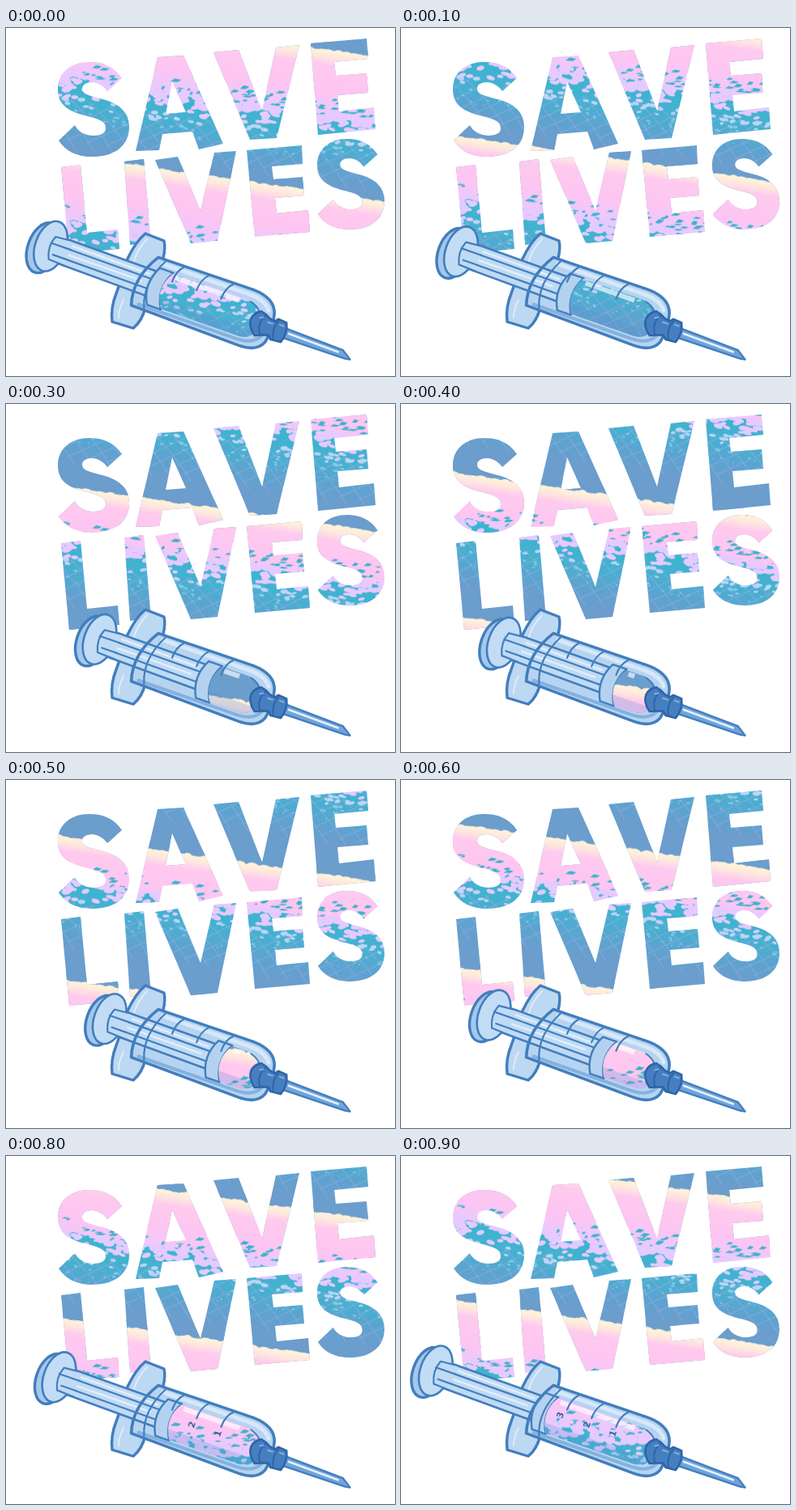
An HTML page with a canvas that plays this animation: 480x430 px, repeating every 1000 ms.

```html
<!DOCTYPE html>
<html lang="en">
<head>
<meta charset="utf-8">
<title>Save lives</title>
<style>
html, body { margin: 0; width: 100%; height: 100%; overflow: hidden; background: #fff; }
canvas { display: block; width: 480px; height: 430px; }
</style>
</head>
<body>
<canvas id="stage" width="480" height="430" role="img" aria-label="SAVE LIVES">SAVE LIVES</canvas>
<script>
const ctx = document.getElementById('stage').getContext('2d');
const TAU = Math.PI * 2;
const STEP = 100;
const PERIOD = 177;      // height of one colour cycle
const LEAD = 12;         // blue kept above the cloud edge
const SHORE = 58;        // mean depth where the water begins
const SLOPE = 0.147;     // tilt of the colour bands
const ANGLE = 19.3 * Math.PI / 180;
const LINE = '#427ebd';

// One entry per step: band scroll and plunger travel
const scroll = [0, 23, 39, 55, 71, 87, 102, 117, 133, 155];
const travel = [0, 20, 43, 64, 76, 77, 63, 40, 11, -13];

// ---------- lettering ----------
const bigS = new Path2D('M143 62C133 47 119 42 103 42C80 42 64 55 64 76C64 97 80 104 101 109' +
  'C117 113 123 116 123 124C123 130 117 133 108 133C97 133 88 127 85 120L65 139' +
  'C73 152 88 159 106 159C135 159 152 145 152 122C152 102 137 92 115 87' +
  'C100 83 94 81 94 75C94 70 99 67 106 67C113 67 120 71 125 78Z');
const letters = new Path2D(
  'M187 36L219 34L268 143L238 150L230 128L193 131L189 151L160 152ZM205 66L197 106L222 104Z' +
  'M256 30L287 27L316 102L333 24L362 21L334 136L301 138Z' +
  'M376 19L445 13L447 38L405 42L407 59L445 56L447 80L409 83L411 103L454 98L456 125L385 132Z' +
  'M68 172L92 169L100 253L138 249L140 273L78 279Z' +
  'M146 165L170 162L179 265L153 268Z' +
  'M184 163L212 159L240 226L257 154L284 152L261 263L228 266Z' +
  'M297 151L365 145L366 168L328 171L330 187L366 184L368 207L332 210L334 229L373 225L375 252L307 258Z');
letters.addPath(bigS);
letters.addPath(bigS, new DOMMatrix([0.943, 0, 0, 0.957, 323.6, 96.8]));

// ---------- colour bands ----------
let seed = 7;
function rnd(a, b) {
  seed = (seed * 16807) % 2147483647;
  return a + (b - a) * seed / 2147483647;
}

function layer(height) {
  const c = document.createElement('canvas');
  c.width = 480;
  c.height = height;
  return c.getContext('2d');
}

function fade(g, from, to, stops) {
  const grad = g.createLinearGradient(0, from, 0, to);
  stops.forEach(([at, color]) => grad.addColorStop(at, color));
  return grad;
}

function blob(g, x, y, rx, ry, turn) {
  g.beginPath();
  g.ellipse(x, y, rx, ry, turn, 0, TAU);
  g.fill();
}

// cloud edge melting into pink
function makeSky() {
  const g = layer(120);
  g.translate(0, LEAD);
  g.fillStyle = '#6b9dcd';
  g.fillRect(0, -LEAD, 480, LEAD + 4);
  g.fillStyle = '#fff1d9';
  for (let x = -4; x < 490; x += rnd(5, 10)) blob(g, x, 2, rnd(6, 10), rnd(3, 6), 0);
  g.fillStyle = fade(g, 0, 80, [[0, '#fff1d9'], [0.08, '#ffe6df'], [0.2, '#ffcaee'], [0.6, '#fdc5f2'], [1, '#e6caff']]);
  g.fillRect(0, 1, 480, 110);
  return g.canvas;
}

// water with shards at the shore, floating petals and a net of ripples
function makeSea() {
  const g = layer(PERIOD);
  const shard = (x, y, w, h) => {
    g.beginPath();
    g.moveTo(x - w, y + h);
    g.lineTo(x - w * 0.2, y - h);
    g.lineTo(x + w, y - h * 0.8);
    g.lineTo(x + w * 0.3, y + h * 0.7);
    g.fill();
  };
  g.fillStyle = '#3cb3cc';
  for (let i = 0; i < 130; i++) shard(rnd(0, 480), 25 - 23 * rnd(0, 1) ** 1.6, rnd(2, 7), rnd(0.8, 2.6));

  g.fillStyle = fade(g, 25, 108, [[0, '#3bb5cf'], [0.4, '#46b0d0'], [0.7, '#5ba4d0'], [1, '#6b9dcd']]);
  g.fillRect(0, 25, 480, PERIOD);

  g.save();
  g.beginPath();
  g.rect(0, 50, 480, 58);
  g.clip();
  g.strokeStyle = 'rgba(145,172,222,.6)';
  g.lineWidth = 1.3;
  for (let x = -120; x < 600; x += 24) {
    g.beginPath();
    g.moveTo(x, 44);
    g.quadraticCurveTo(x + 38, 72, x + 64, 114);
    g.moveTo(x + 70, 44);
    g.quadraticCurveTo(x + 28, 72, x - 20, 100);
    g.stroke();
  }
  g.restore();

  for (let i = 0; i < 380; i++) {
    const k = rnd(0, 1) ** 1.7;
    g.fillStyle = k < 0.4 ? '#e6caff' : k < 0.62 ? '#bdd4f5' : '#82cbe6';
    const r = (1 - k) * rnd(3.5, 7) + 1;
    blob(g, rnd(0, 480), 24 + k * 58, r, r * rnd(0.38, 0.6), rnd(-0.5, 0.25));
  }
  return g.canvas;
}
const sky = makeSky(), sea = makeSea();

// The water drifts up and down against the sky once per loop
function paintBands(top, step) {
  const shore = SHORE - 16 + 14 * Math.cos(TAU * step / scroll.length);
  ctx.setTransform(1, SLOPE, 0, 1, 0, 0);
  for (let y = top - 3 * PERIOD; y < 430; y += PERIOD) {
    ctx.drawImage(sky, 0, y - LEAD);
    ctx.drawImage(sea, 0, Math.round(y + shore));
  }
}

// ---------- syringe ----------
const flange = new Path2D('M172 254L195 263Q197 272 194 284L172 345Q168 362 157 371L131 363' +
  'Q129 345 136 328Q146 300 150 285Q160 264 172 254Z');
const barrel = new Path2D('M-2 -36L122 -37Q150 -36 156 -18Q161 0 157 19Q151 34 128 34L-14 31Q-24 -2 -2 -36Z');
const hub = new Path2D('M140 -15Q147 -14 153 -10L160 -9L163 -13L174 -12Q180 0 175 13L162 14L158 10L151 12' +
  'L142 16Q131 8 131 -2Q132 -11 140 -15Z');
const needle = new Path2D('M176 -5L251 -3L263 5L257 6L176 7Z');

function shape(path, fill, width = 3, line = LINE) {
  if (fill) { ctx.fillStyle = fill; ctx.fill(path); }
  ctx.lineWidth = width;
  ctx.strokeStyle = line;
  if (width) ctx.stroke(path);
}
const lines = (d, width, color) => shape(new Path2D(d), null, width, color);

function toAxis() {
  ctx.setTransform(1, 0, 0, 1, 178, 318);
  ctx.rotate(ANGLE);
}

function oval(u, v, rx, ry, fill, width) {
  const p = new Path2D();
  p.ellipse(u, v, rx, ry, 0, 0, TAU);
  shape(p, fill, width);
}

function plunger(move, end) {
  const a = move - 128;
  shape(new Path2D(`M${a} -20L${end - 14} -19V14L${a} 12Z`), '#bfdaf4', 2.6);
  lines(`M${a} -9L${end - 16} -8M${a + 8} 4L${end - 18} 5`, 2.2, LINE);
  lines(`M${a + 22} -14L${end - 28} -13M${a + 12} -2H${end - 34}`, 2.4, '#e1eefb');
  oval(move - 140, 0, 19, 32, '#a4c8ec', 3.4);
  oval(move - 132, -5, 19, 32, '#c3dcf5', 2.6);
  // root of the fins on the disc
  shape(new Path2D(`M${a + 20} -20L${a - 3} -18L${a - 2} 10L${a + 20} 12Z`), '#bfdaf4', 0);
  lines(`M${a + 21} -20L${a - 2} -18Q${a - 8} -4 ${a - 1} 11L${a + 21} 12M${a - 5} -9H${a + 21}M${a + 2} 4H${a + 21}`, 2.2, LINE);
}

function fluid(start, step) {
  const body = new Path2D(`M${start} -23H122Q143 -20 143 0Q143 22 124 23H${start}Q${start - 15} 0 ${start} -23Z`);
  ctx.save();
  ctx.clip(body);
  ctx.save();
  paintBands(148 + 56 - scroll[step], step);
  ctx.restore();
  ctx.fillStyle = 'rgba(88,140,202,.25)';
  ctx.fillRect(start - 15, 11, 170, 20);
  ctx.fillStyle = 'rgba(255,255,255,.65)';
  ctx.fillRect(start + 4, -22, 106 - start, 6);
  ctx.restore();
}

function digits(start, step) {
  if (step < 7) return;
  ctx.fillStyle = '#37649f';
  ctx.font = 'bold 11px "DejaVu Sans", sans-serif';
  ctx.textAlign = 'center';
  ctx.textBaseline = 'middle';
  [['3', 19], ['2', 54], ['1', 88]].forEach(([n, u]) => {
    if (u < start + 4) return;
    ctx.save();
    ctx.translate(u, -4);
    ctx.rotate(-Math.PI / 2);
    ctx.fillText(n, 0, 0);
    ctx.restore();
  });
}

function syringe(step) {
  const move = travel[step], start = 22 + move;
  ctx.save();
  ctx.lineJoin = ctx.lineCap = 'round';
  shape(flange, '#bcd8f3', 3.4);
  lines('M174 261Q161 274 157 291M145 336Q139 348 139 358', 2, '#deecfa');

  toAxis();
  shape(barrel, '#b6d4f1', 0);
  plunger(move, start);
  shape(new Path2D(`M${start - 18} -24H${start}Q${start - 14} 0 ${start} 24H${start - 18}Q${start - 31} 0 ${start - 18} -24Z`), '#b4d2ef', 2.4);
  fluid(start, step);

  // glass shading
  lines('M6 -30H120Q140 -30 148 -19', 5, 'rgba(225,239,252,.75)');
  lines('M-6 27H122Q143 27 150 14', 4, 'rgba(112,163,214,.7)');
  lines('M8 -34Q-10 0 2 29', 2.2, LINE);
  lines([28, 60, 92].map(u => `M${u + 4} -35Q${u - 4} -27 ${u - 4} -13`).join(''), 2.2, LINE);
  lines('M124 -22Q139 -18 142 -5', 2, LINE);
  digits(start, step);
  shape(barrel, null, 3.6);

  shape(needle, '#6fa5da', 2.4);
  lines('M181 0L246 1', 2.6, '#e3f0fb');
  shape(hub, '#467fc0', 2.6, '#2f64a8');
  lines('M147 -12Q139 0 148 13M164 -11Q159 0 165 12', 2, '#2f64a8');
  lines('M141 -7L145 -9M152 -5H158M167 -7H172', 2, '#82b2e0');
  ctx.restore();
}

// ---------- playback ----------
function draw(step) {
  ctx.setTransform(1, 0, 0, 1, 0, 0);
  ctx.fillStyle = '#fff';
  ctx.fillRect(0, 0, 480, 430);
  ctx.save();
  ctx.clip(letters, 'evenodd');
  paintBands(148 - scroll[step], step);
  ctx.restore();
  syringe(step);
}

const begin = performance.now();
let shown = -1;
function tick() {
  const step = Math.floor((performance.now() - begin) / STEP) % scroll.length;
  if (step !== shown) draw(shown = step);
  requestAnimationFrame(tick);
}
tick();
</script>
</body>
</html>
```
